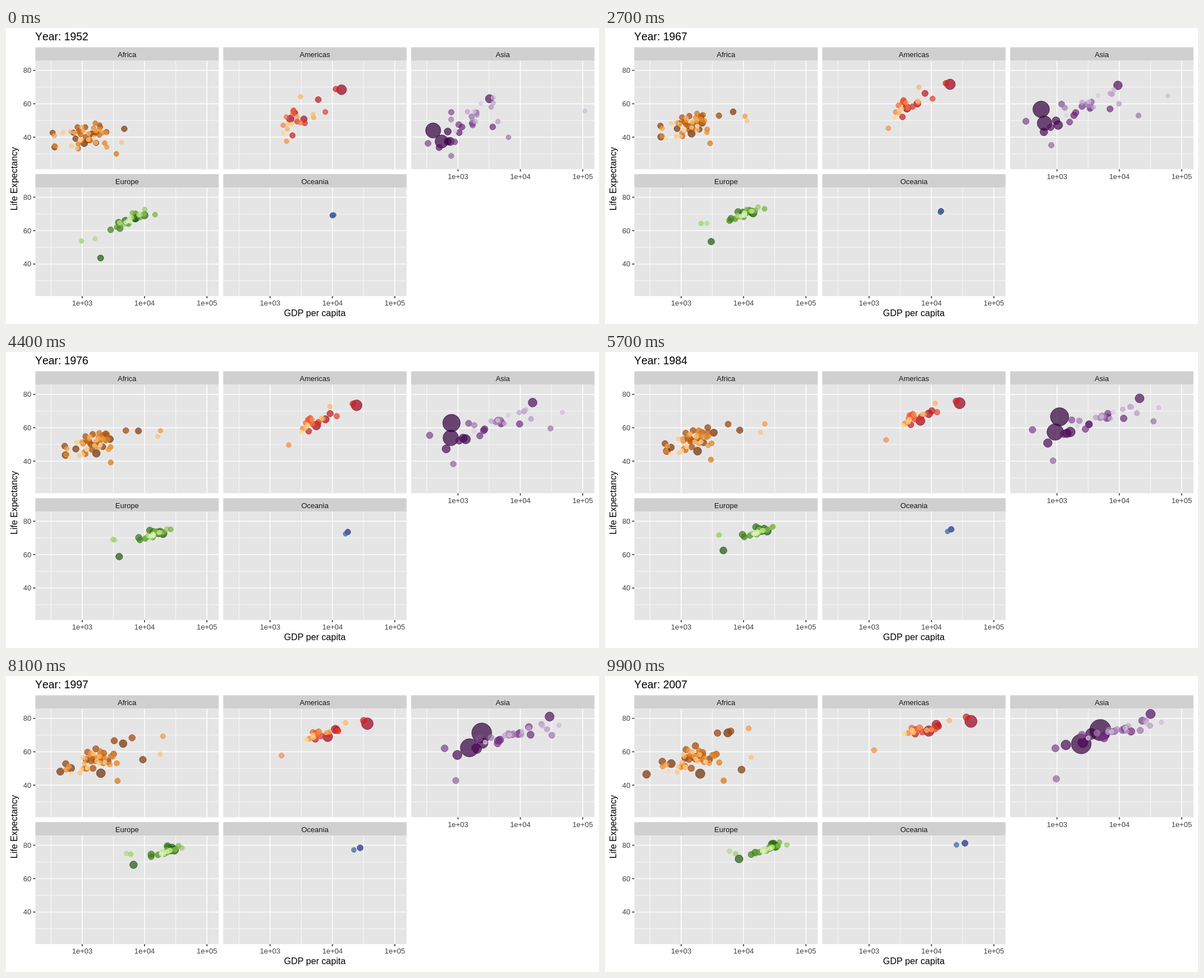
Animation, 1058 px wide and 529 px high, one loop 10000 ms. Source, as an HTML page:

```html
<!DOCTYPE html>
<html lang="en">
<head>
<meta charset="utf-8">
<title>Life expectancy and GDP</title>
<style>
html, body { margin: 0; width: 100%; height: 100%; overflow: hidden; background: #fff; }
svg {
  display: block; width: 1058px; height: 529px;
  font-family: "Liberation Sans", Arial, sans-serif; font-kerning: none;
}
</style>
</head>
<body>
<svg id="stage" viewBox="0 0 1058 529"></svg>
<script>
const stage = document.getElementById('stage');
const LOOP = 10000, STEP = 100, SCALE = 1.44, GAMMA = 1.2;
const W = 327.1, H = 193.8, DECADE = 111.25, PER_YEAR = 2.985;
const panels = [];
let current, seed;

function el(tag, attrs, text) {
  const node = document.createElementNS('http://www.w3.org/2000/svg', tag);
  for (const k in attrs) node.setAttribute(k, attrs[k]);
  if (text) node.textContent = text;
  return stage.appendChild(node);
}
const label = (x, y, size, fill, text, anchor = 'middle') =>
  el('text', { x, y, 'font-size': size, fill, 'text-anchor': anchor }, text);
const line = (x1, y1, x2, y2, stroke, width) =>
  el('line', { x1, y1, x2, y2, stroke, 'stroke-width': width });

function random() {
  seed = (seed * 16807) % 2147483647;
  return seed / 2147483647;
}
// triangular spread between -1 and 1
const spread = () => random() + random() - 1;

function panel(name, col, row, colors, hasX) {
  const x = 52.4 + col * 335.2, y = row ? 285.3 : 58.6;
  const right = x + W, bottom = y + H;
  const x3 = x + 83.6, y60 = y + 76.8;
  el('rect', { x, y: y - 24.1, width: W, height: 24.1, fill: '#d0d0d0' });
  el('rect', { x, y, width: W, height: H, fill: '#e5e5e5' });
  label(x + W / 2, y - 6.5, 13, '#151515', name);
  for (const v of [30, 50, 70, 40, 60, 80]) {
    const gy = y60 + (60 - v) * PER_YEAR, major = v % 20 === 0;
    line(x, gy, right, gy, '#fff', major ? 1.54 : 0.77);
    if (major && col === 0) {
      line(x - 4, gy, x, gy, '#2a2a2a', 1.54);
      label(x - 7.2, gy + 4.6, 13, '#404040', v, 'end');
    }
  }
  for (const v of [2.5, 3.5, 4.5, 3, 4, 5]) {
    const gx = x3 + (v - 3) * DECADE, major = v % 1 === 0;
    line(gx, y, gx, bottom, '#fff', major ? 1.54 : 0.77);
    if (major && hasX) {
      line(gx, bottom, gx, bottom + 4, '#2a2a2a', 1.54);
      label(gx, bottom + 17.3, 13, '#404040', '1e+0' + v);
    }
  }
  seed = 1952 + 77 * panels.length;
  current = { x3, y60, colors: colors.split(' '), dots: [] };
  panels.push(current);
}

function addDot(pop0, pop1, wealth, life) {
  const node = el('circle', {
    'fill-opacity': 0.7, 'stroke-opacity': 0.7, 'stroke-width': 1
  });
  current.dots.push({ node, pop0, pop1, wealth, life });
}

// landmark country: population in millions at both ends,
// GDP and life expectancy at the start, middle and end
const dot = (pop0, pop1, gdp, life) => addDot(pop0, pop1, gdp.map(Math.log10), life);

// the other countries scatter around the trend of their continent;
// each trend stage is [log GDP, its spread, life, slope, life spread]
function crowd(count, maxPop, minPop, growth, stages) {
  for (let i = 0; i < count; i++) {
    const pop = minPop + (maxPop - minPop) * (1 - (i + 0.5) / count) ** 2;
    const a = spread(), b = spread(), c = spread(), d = spread();
    const wealth = [], life = [];
    stages.forEach(([x, dx, y, slope, dy], k) => {
      const z = a + (b - a) * k * 0.15, noise = c + (d - c) * k * 0.2;
      wealth.push(x + dx * z);
      life.push(y + slope * z + dy * noise);
    });
    addDot(pop / growth, pop, wealth, life);
  }
}

// smooth path through start, middle and end
const curve = ([a, b, c], f) =>
  a * (1 - f) * (1 - 2 * f) + 4 * b * f * (1 - f) + c * f * (2 * f - 1);

function ramp(colors, f) {
  const p = f * (colors.length - 1), i = Math.min(Math.floor(p), colors.length - 2);
  const channel = (c, k) => parseInt(c.slice(k * 2, k * 2 + 2), 16);
  const rgb = [0, 1, 2].map(k => {
    const a = channel(colors[i], k), b = channel(colors[i + 1], k);
    return Math.round(255 * ((a + (b - a) * (p - i)) / 255) ** GAMMA);
  });
  return `rgb(${rgb})`;
}

function radius(pop) {
  const size = 2 + 10 * Math.sqrt(Math.max(0, pop - 0.06) / 1318.6);
  return 0.375 * SCALE * (size * 2.845 + 0.94);
}

panel('Africa', 0, 0, '7f3b08 b35806 e08214 fdb863 fee0b6');
dot(33.1, 135, [1077, 1750, 2014], [36.3, 45.3, 46.9]);
dot(22.2, 80.3, [1419, 3000, 5581], [41.9, 54.8, 71.3]);
dot(20.9, 76.5, [362, 560, 691], [34.1, 44.7, 52.9]);
dot(14.1, 64.6, [781, 750, 278], [39.1, 47.8, 46.5]);
dot(14.3, 44, [4725, 8300, 9270], [45, 58.5, 49.3]);
dot(9.28, 33.3, [2449, 5300, 6223], [43.1, 60, 72.3]);
dot(9.94, 33.8, [1688, 2500, 3820], [42.9, 58, 71.2]);
dot(4.23, 12.4, [3521, 2900, 4797], [30, 40, 42.7]);
dot(1.02, 6.04, [2388, 20000, 12057], [42.7, 60, 74]);
dot(0.42, 1.45, [4293, 17500, 13206], [37, 56, 56.7]);
crowd(42, 42, 0.2, 3.6, [[2.97, 0.5, 39.8, 2, 9], [3.1, 0.48, 50, 5, 9], [3.12, 0.65, 54.5, 5, 11]]);

panel('Americas', 1, 0, 'a50026 d73027 f46d43 fdae61 fee090');
dot(158, 301, [13990, 26000, 42952], [68.4, 74, 78.2]);
dot(14.8, 33.4, [11367, 22800, 36319], [68.8, 75, 80.7]);
dot(56.6, 190, [2109, 6000, 9066], [50.9, 62.5, 72.4]);
dot(30.1, 109, [3478, 8300, 11978], [50.8, 66.5, 76.2]);
dot(17.9, 40.3, [5911, 9600, 12779], [62.5, 69.2, 75.3]);
dot(5.44, 26.1, [7690, 12000, 11416], [55.1, 68, 73.7]);
dot(3.2, 8.5, [1840, 1950, 1202], [37.6, 51, 60.9]);
dot(2.23, 3.94, [3082, 10100, 19329], [64.3, 73.6, 78.7]);
crowd(17, 44, 1, 3.4, [[3.43, 0.33, 52, 5, 12], [3.69, 0.27, 65, 6, 7], [3.8, 0.42, 73, 3, 4.5]]);

panel('Asia', 2, 0, '40004b 762a83 9970ab c2a5cf e7d4e8', true);
dot(8.43, 31.9, [779, 850, 975], [28.8, 39.2, 43.8]);
dot(46.9, 150, [684, 670, 1391], [37.5, 48.8, 64.1]);
dot(556, 1319, [400, 900, 4959], [44, 64.5, 73]);
dot(372, 1110, [547, 830, 2452], [37.4, 55.5, 64.7]);
dot(82.1, 224, [750, 1450, 3541], [37.5, 55, 70.7]);
dot(86.5, 127, [3217, 18000, 31656], [63, 76.2, 82.6]);
dot(20.9, 49, [1031, 5200, 23348], [47.5, 66.2, 78.6]);
dot(0.16, 2.51, [108382, 45000, 47307], [55.6, 70.5, 77.6]);
dot(20.1, 47.8, [331, 370, 944], [36.3, 57, 62.1]);
dot(41.3, 169, [685, 1300, 2606], [43.4, 55, 65.5]);
dot(4.01, 27.6, [6460, 33000, 21655], [39.9, 61.5, 72.8]);
crowd(22, 91, 0.7, 3.5, [[3.2, 0.52, 50, 6, 12], [3.65, 0.75, 64, 7, 6], [3.92, 0.85, 72.3, 7, 4]]);

panel('Europe', 0, 1, '276419 4d9221 7fbc41 b8e186 e6f5d0', true);
dot(1.28, 3.6, [1601, 3590, 5937], [55.2, 70, 76.4]);
dot(2.79, 4.55, [974, 3500, 7446], [53.8, 70.3, 74.9]);
dot(42.5, 61.1, [7030, 19300, 30470], [67.4, 74.4, 80.7]);
dot(69.1, 82.4, [7144, 21500, 32170], [67.5, 73.2, 79.4]);
dot(47.7, 58.1, [4931, 15400, 28570], [65.9, 74.3, 80.5]);
dot(3.33, 4.63, [10095, 25000, 49357], [72.7, 75.7, 80.2]);
dot(25.7, 38.5, [4029, 8700, 15390], [61.3, 71, 75.6]);
dot(28.5, 40.4, [3835, 13600, 28821], [64.9, 75.4, 80.9]);
dot(4.82, 7.55, [14734, 27700, 37506], [69.6, 75.8, 81.7]);
dot(22.2, 71.2, [1969, 4250, 8458], [43.6, 60.4, 71.8]);
dot(50.4, 60.8, [9980, 17900, 33203], [69.2, 73.4, 79.4]);
crowd(19, 22, 0.3, 1.2, [[3.74, 0.34, 66.3, 7, 3], [4.16, 0.26, 72.3, 4, 2], [4.35, 0.34, 77.3, 5, 1.6]]);

panel('Oceania', 1, 1, '313695 4575b4', true);
dot(8.69, 20.4, [10040, 18900, 34435], [69.1, 74.2, 81.2]);
dot(1.99, 4.12, [10557, 17000, 25185], [69.4, 73, 80.2]);

// the larger the population, the darker the colour
for (const { dots, colors } of panels) {
  [...dots].sort((a, b) => b.pop1 - a.pop1).forEach(({ node }, i) => {
    const c = ramp(colors, i / (dots.length - 1));
    node.setAttribute('fill', c);
    node.setAttribute('stroke', c);
  });
}

const title = label(52, 22, 19.4, '#000', 'Year: 1952', 'start');
label(551, 514.5, 16.1, '#000', 'GDP per capita');
el('text', {
  transform: 'translate(19.5 269.5) rotate(-90)', 'font-size': 16.1, 'text-anchor': 'middle'
}, 'Life Expectancy');

function draw(ms) {
  const f = Math.floor((ms % LOOP) / STEP) / (LOOP / STEP - 1);
  title.textContent = 'Year: ' + Math.round(1952 + 55 * f);
  for (const { x3, y60, dots } of panels) {
    for (const d of dots) {
      d.node.setAttribute('cx', (x3 + (curve(d.wealth, f) - 3) * DECADE).toFixed(2));
      d.node.setAttribute('cy', (y60 + (60 - curve(d.life, f)) * PER_YEAR).toFixed(2));
      d.node.setAttribute('r', radius(d.pop0 * (d.pop1 / d.pop0) ** f).toFixed(2));
    }
  }
}

const start = performance.now();
function tick() {
  draw(performance.now() - start);
  requestAnimationFrame(tick);
}
tick();
</script>
</body>
</html>
```
